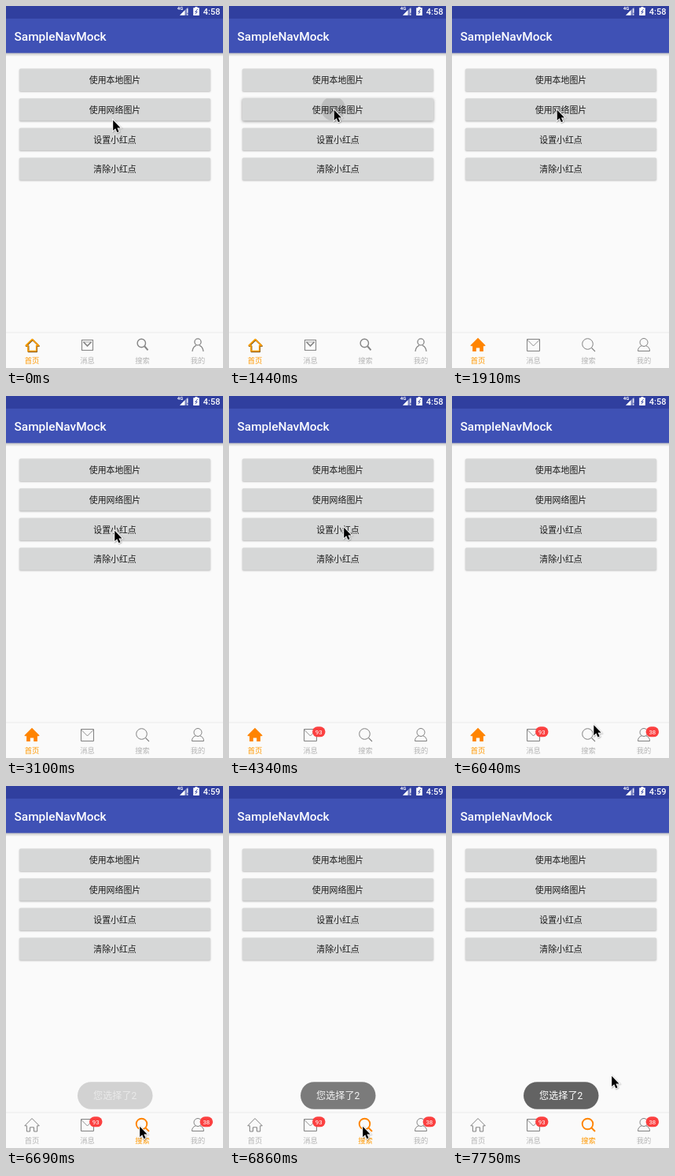
An HTML page with a canvas for the animation above (8000 ms loop, 276 by 459 pixels).

```html
<!DOCTYPE html>
<html lang="zh">
<head>
<meta charset="utf-8">
<title>Tab bar demo</title>
<style>
html, body { margin: 0; width: 100%; height: 100%; overflow: hidden; background: #fafafa; }
canvas { display: block; width: 276px; height: 459px; }
</style>
</head>
<body>
<canvas id="stage"></canvas>
<script>
const W = 276, H = 459, LOOP = 8000;
const canvas = document.getElementById('stage');
const dpr = window.devicePixelRatio || 1;
canvas.width = W * dpr;
canvas.height = H * dpr;
const c = canvas.getContext('2d');

const LATIN = 'Roboto, "Noto Sans CJK SC", "Noto Sans CJK", sans-serif';
const CJK = '"Noto Sans CJK SC", "Noto Sans CJK", "Noto Sans CJK JP", sans-serif';
const ORANGE = '#ff8400', GRAY = '#808080';

const BUTTONS = ['使用本地图片', '使用网络图片', '设置小红点', '清除小红点'];
const TABS = [['首页', 33], ['消息', 103.5], ['搜索', 173.5], ['我的', 244]];

// Pointer moves: start, end, steps, path points
const MOVES = [
  [240, 360, 3, [[135, 143], [132.5, 130]]],
  [2630, 3100, 9, [[132.5, 130], [138, 155], [145, 177], [137, 169]]],
  [4160, 4340, 3, [[137, 169], [145, 165]]],
  [5340, 5690, 7, [[145, 165], [152, 176], [164, 193], [186, 250], [202, 320], [208, 370], [202, 388], [186, 377]]],
  [5870, 6270, 8, [[186, 377], [180, 412], [173, 439], [169, 430]]],
  [7570, 7750, 4, [[169, 430], [190, 395], [202, 366]]]
];

// Button presses: index, start, end
const PRESSES = [[1, 1440, 1910], [2, 3330, 3510], [2, 4640, 4810]];

const clamp = v => Math.max(0, Math.min(1, v));

function along(pts, u) {
  const n = pts.length - 1, i = Math.min(n - 1, Math.floor(u * n + 1e-6)), f = u * n - i;
  return [0, 1].map(k => pts[i][k] + (pts[i + 1][k] - pts[i][k]) * f);
}

function pointerAt(t) {
  let pos = MOVES[0][3][0];
  for (const [t0, t1, n, pts] of MOVES) {
    if (t < t0) break;
    const k = Math.floor((t - t0) / ((t1 - t0) / (n - 1)) + 0.001);
    pos = along(pts, Math.min(1, (k + 1) / n));
  }
  return pos;
}

function text(s, x, y, font, color, align = 'center') {
  c.font = font;
  c.fillStyle = color;
  c.textAlign = align;
  c.fillText(s, x, y);
}

function pill(x, y, w, h, r, color) {
  c.beginPath();
  c.roundRect(x, y, w, h, r);
  c.fillStyle = color;
  c.fill();
}

function trace(d, color, width) {
  c.strokeStyle = color;
  c.lineWidth = width;
  c.stroke(new Path2D(d));
}

function fillPath(d, color) {
  c.fillStyle = color;
  c.fill(new Path2D(d));
}

function circle(x, y, r, color, width) {
  c.beginPath();
  c.arc(x, y, r, 0, Math.PI * 2);
  c.strokeStyle = color;
  c.lineWidth = width;
  c.stroke();
}

function header(clock) {
  c.fillStyle = '#303f9f';
  c.fillRect(0, 0, W, 16);
  const g = c.createLinearGradient(0, 59, 0, 64);
  g.addColorStop(0, 'rgba(0,0,0,.25)');
  g.addColorStop(1, 'rgba(0,0,0,0)');
  c.fillStyle = g;
  c.fillRect(0, 59, W, 5);
  c.fillStyle = '#3f51b5';
  c.fillRect(0, 16, W, 43.6);
  text('SampleNavMock', 10.5, 44, '500 15.4px ' + LATIN, '#fff', 'left');

  text('4G', 221.5, 5.2, '700 6px ' + LATIN, '#fff');
  fillPath('M231.5 1.2V11.7H221Z', 'rgba(255,255,255,.35)');
  fillPath('M227.5 5.2V11.7H221Z', '#fff');
  trace('M230.8 3.2V8.7M230.8 10.2V11.7', '#fff', 1.2);
  fillPath('M240.5 1H243.5V2.2H245.8V12H238.2V2.2H240.5Z', '#fff');
  trace('M243.8 4L240.8 7.4H243.2L240.6 10.4', '#303f9f', 0.9);
  text(clock, 272.5, 10.6, '500 11px ' + LATIN, '#fff', 'right');
}

function buttons(t) {
  BUTTONS.forEach((label, i) => {
    const y = 79.6 + i * 37.6, h = 28.4;
    const press = PRESSES.find(p => p[0] === i && t >= p[1] && t < p[2]);
    c.save();
    c.shadowColor = press ? 'rgba(0,0,0,.42)' : 'rgba(0,0,0,.28)';
    c.shadowBlur = (press ? 3.5 : 2) * dpr;
    c.shadowOffsetY = 0.8 * dpr;
    pill(17, y, 243, h, 1.5, '#d6d7d7');
    c.restore();
    if (press) {
      const u = (t - press[1]) / (press[2] - press[1]);
      const [px, py] = pointerAt(t);
      c.save();
      c.beginPath();
      c.roundRect(17, y, 243, h, 1.5);
      c.clip();
      c.fillStyle = `rgba(0,0,0,${0.12 * clamp((1 - u) * 2)})`;
      c.beginPath();
      c.arc(px, py, 15 + 125 * clamp(u * 1.7), 0, Math.PI * 2);
      c.fill();
      c.restore();
    }
    text(label, 138.5, y + 18.8, '500 10.9px ' + CJK, '#1b1b1b');
  });
}

// Heavier bundled icon set
function localIcons() {
  const dark = '#7a5518', g = '#858585';
  const house = 'M25.2 430.4L33.3 422.6L41.4 430.4H38.6V437.6H28V430.4Z';
  c.save();
  c.lineJoin = 'round';
  c.translate(0.5, 0.7);
  trace(house, dark, 1.9);
  c.translate(-0.5, -0.7);
  trace(house, '#ffa000', 1.5);
  c.restore();
  trace('M96.5 423.5H110.5V436.5H96.5Z', g, 1.1);
  trace('M98.5 426L103.5 431L108.5 426', g, 1.7);
  trace('M98 426H109', g, 0.7);
  circle(172.3, 427.5, 5.2, g, 1.4);
  trace('M176.3 431.5L180.5 436.3', g, 2);
  circle(244, 426, 4.1, g, 1.3);
  trace('M237 438Q237.6 432 242 430.3M246 430.3Q250.4 432 251 438', g, 1.3);
}

// Thin-line icon set
function webIcons(active) {
  if (active === 0) {
    fillPath('M33 420.8L42.5 430.3Q42.5 431.3 41.5 431.3H39.9V438H35.2V433.4H30.8V438H26.1V431.3H24.5Q23.5 431.3 23.5 430.3Z', ORANGE);
  } else {
    trace('M23.8 430.8L33 421.5L42.3 430.8H39.7V438H35.5V432.8H30.5V438H26.4V430.8Z', GRAY, 1);
  }
  trace('M95.5 422.5H111.5V437.5H95.5Z', GRAY, 1);
  trace('M95.5 423L103.5 431L111.5 423', GRAY, 0.9);
  const on = active === 2;
  circle(172.5, 428.5, 6.8, on ? ORANGE : GRAY, on ? 1.9 : 1);
  trace('M177.5 433.5L182 438', on ? ORANGE : GRAY, on ? 2 : 1.1);
  circle(244, 426.5, 5, GRAY, 1);
  trace('M241.3 430.8Q236.5 432.5 236.5 437.5H251.5Q251.5 432.5 246.7 430.8', GRAY, 1);
}

function badge(x, n) {
  pill(x, 419.3, 16.5, 13, 6.5, '#fb4040');
  text(n, x + 8.25, 428.7, '400 7.8px ' + LATIN, '#fff');
}

function tabBar(t) {
  const active = t < 6570 ? 0 : 2;
  c.fillStyle = '#fafafa';
  c.fillRect(0, 414, W, 45);
  c.fillStyle = '#ebebeb';
  c.fillRect(0, 413.5, W, 1);
  if (t < 1570) localIcons(); else webIcons(active);
  TABS.forEach(([label, x], i) =>
    text(label, x, 452.6, '400 9.3px ' + CJK, i === active ? '#ff9800' : '#b4b4b4'));
  if (t >= 3390) badge(106, '93');
  if (t >= 4700) badge(246.6, '38');
}

function toast(t) {
  const a = clamp((t - 6610) / 300);
  if (!a) return;
  c.save();
  c.globalAlpha = a;
  pill(91, 375.3, 95.5, 34.4, 17.2, '#636363');
  c.globalAlpha = Math.sqrt(a);
  text('您选择了2', 138.7, 397, '400 12.1px ' + LATIN, '#fff');
  c.restore();
}

function pointer([x, y]) {
  const d = 'M0 0V13.2L3 10.4L5.2 15.4L7.4 14.4L5.2 9.6H9.3Z';
  c.save();
  c.translate(x + 1.2, y + 1.8);
  c.shadowColor = 'rgba(0,0,0,.35)';
  c.shadowBlur = 1.5 * dpr;
  c.shadowOffsetX = c.shadowOffsetY = 0.6 * dpr;
  trace(d, '#fff', 2);
  c.shadowColor = 'transparent';
  fillPath(d, '#000');
  c.restore();
}

function draw(t) {
  c.setTransform(dpr, 0, 0, dpr, 0, 0);
  c.fillStyle = '#fafafa';
  c.fillRect(0, 0, W, H);
  header(t < 6630 ? '4:58' : '4:59');
  buttons(t);
  tabBar(t);
  toast(t);
  pointer(pointerAt(t));
}

const start = performance.now();
function tick() {
  draw((performance.now() - start) % LOOP);
  requestAnimationFrame(tick);
}
tick();
</script>
</body>
</html>
```
